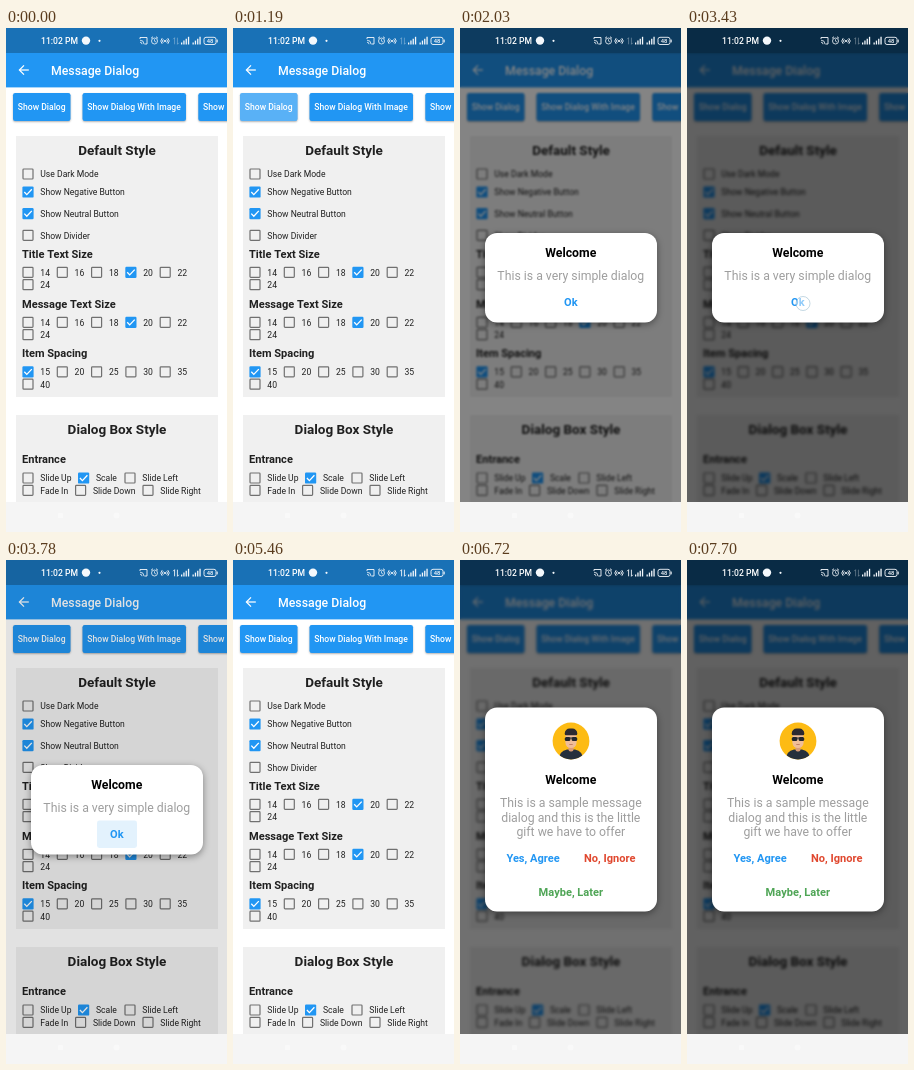
These frames come from a looping animation (221x504 px, 8 s). An HTML page with a canvas:

```html
<!DOCTYPE html>
<html lang="en">
<head>
<meta charset="utf-8">
<title>Message Dialog</title>
<style>
html, body { margin: 0; width: 100%; height: 100%; overflow: hidden; background: #fff; }
canvas { display: block; width: 221px; height: 504px; }
</style>
</head>
<body>
<canvas id="stage"></canvas>
<script>
const W = 221, H = 504, LOOP = 8000;
const BAR = 25, NAV = 474;
const BLUE = '#2196f3', INK = '#202020', CARD = '#f0f0f0';
const dpr = window.devicePixelRatio || 1;

function makeCanvas(el) {
  el.width = Math.round(W * dpr);
  el.height = Math.round(H * dpr);
  const c = el.getContext('2d');
  c.scale(dpr, dpr);
  return c;
}
const stage = makeCanvas(document.getElementById('stage'));
const pageCanvas = document.createElement('canvas');
const page = makeCanvas(pageCanvas);

const clamp = v => Math.max(0, Math.min(1, v));
const span = (t, a, b) => clamp((t - a) / (b - a));
const easeOut = p => 1 - (1 - p) ** 3;

// y is the middle of the capitals
function text(c, s, x, y, size, weight, color, align = 'left') {
  c.font = `${weight} ${size}px Roboto, sans-serif`;
  c.textAlign = align;
  c.fillStyle = color;
  c.fillText(s, x, y + size * 0.355);
}

function box(c, x, y, w, h, r, color) {
  c.fillStyle = color;
  c.beginPath();
  c.roundRect(x, y, w, h, r);
  c.fill();
}

function disc(c, x, y, r, color) {
  c.fillStyle = color;
  c.beginPath();
  c.arc(x, y, r, 0, Math.PI * 2);
  c.fill();
}

function line(c, pts, width, color) {
  c.strokeStyle = color;
  c.lineWidth = width;
  c.beginPath();
  pts.forEach(([x, y], i) => i ? c.lineTo(x, y) : c.moveTo(x, y));
  c.stroke();
}

function check(c, x, y, label, on) {
  if (on) {
    box(c, x - 5.6, y - 5.6, 11.2, 11.2, 1.2, BLUE);
    line(c, [[x - 3.7, y], [x - 1.2, y + 2.6], [x + 3.8, y - 2.7]], 1.3, '#fff');
  } else {
    c.strokeStyle = '#707070';
    c.lineWidth = 1.2;
    c.beginPath();
    c.roundRect(x - 5, y - 5, 10, 10, 0.8);
    c.stroke();
  }
  text(c, label, x + 12.3, y + 0.3, 8.6, 400, INK);
}

function sizes(c, title, y, values, picked) {
  text(c, title, 16, y, 11.05, 700, INK);
  values.forEach((v, i) =>
    check(c, 22 + (i % 5) * 34.3, y + 18.3 + (i > 4 ? 12.4 : 0), String(v), i === picked));
}

const buttons = [
  { x: 7, w: 57.5, label: 'Show Dialog' },
  { x: 76.5, w: 103.5, label: 'Show Dialog With Image' },
  { x: 192.3, w: 103.5, label: 'Show Dialog With Style' }
];

function drawButton(c, b) {
  c.save();
  c.shadowColor = 'rgba(0,0,0,.3)';
  c.shadowBlur = 2 * dpr;
  c.shadowOffsetY = dpr;
  box(c, b.x, 65, b.w, 28, 2.2, BLUE);
  c.restore();
  text(c, b.label, b.x + 4.8, 79.2, 8.6, 500, '#fff');
}

function ripple(c, b, x, age) {
  if (age < 0 || age > 480) return;
  c.save();
  c.beginPath();
  c.roundRect(b.x, 65, b.w, 28, 2.2);
  c.clip();
  c.globalAlpha = 0.25 * (1 - span(age, 250, 480));
  disc(c, x, 79, 6 + b.w * 0.6 * easeOut(span(age, 0, 280)), '#fff');
  c.restore();
}

function pointer(c, x, y, age, life) {
  if (age < 0 || age > life) return;
  disc(c, x, y, 7, 'rgba(255,255,255,.5)');
  c.strokeStyle = 'rgba(120,165,190,.55)';
  c.lineWidth = 0.8;
  c.stroke();
}

function drawPage(c, t) {
  c.fillStyle = '#fff';
  c.fillRect(0, 0, W, H);
  c.fillStyle = BLUE;
  c.fillRect(0, 0, W, 59.4);
  c.fillStyle = 'rgba(0,0,0,.25)';
  c.fillRect(0, 0, W, BAR);

  line(c, [[22.8, 42], [13.6, 42]], 1.25, '#fff');
  line(c, [[18, 37.4], [13.4, 42], [18, 46.6]], 1.25, '#fff');
  text(c, 'Message Dialog', 45, 42.3, 12.28, 500, '#fff');

  buttons.forEach(b => drawButton(c, b));
  ripple(c, buttons[0], 38, t - 1050);
  ripple(c, buttons[1], 130, t - 5880);

  box(c, 10, 108, 202, 261, 0, CARD);
  text(c, 'Default Style', 111, 122, 13.5, 700, INK, 'center');
  check(c, 22, 146, 'Use Dark Mode', false);
  check(c, 22, 164, 'Show Negative Button', true);
  check(c, 22, 185.6, 'Show Neutral Button', true);
  check(c, 22, 207.3, 'Show Divider', false);
  sizes(c, 'Title Text Size', 226, [14, 16, 18, 20, 22, 24], 3);
  sizes(c, 'Message Text Size', 276, [14, 16, 18, 20, 22, 24], 3);
  sizes(c, 'Item Spacing', 325.5, [15, 20, 25, 30, 35, 40], 0);

  box(c, 10, 387, 202, 100, 0, CARD);
  text(c, 'Dialog Box Style', 111, 401, 13.5, 700, INK, 'center');
  text(c, 'Entrance', 16, 431.3, 11.05, 700, INK);
  check(c, 22, 450, 'Slide Up', false);
  check(c, 77.6, 450, 'Scale', true);
  check(c, 124, 450, 'Slide Left', false);
  check(c, 22, 462.4, 'Fade In', false);
  check(c, 74.6, 462.4, 'Slide Down', false);
  check(c, 142, 462.4, 'Slide Right', false);
}

function drawStatus(c, t) {
  const ink = '#f4f8fc', faint = 'rgba(255,255,255,.35)';
  text(c, '11:02 PM', 35, 13, 8.6, 500, '#fff');
  disc(c, 80, 12.6, 4.2, ink);
  disc(c, 93.5, 12.8, 1.1, ink);

  // cast
  line(c, [[134, 11], [134, 9.5], [141, 9.5], [141, 16], [138.5, 16]], 0.9, ink);
  c.lineWidth = 0.8;
  [2, 4].forEach(r => {
    c.beginPath();
    c.arc(134, 16.2, r, -Math.PI / 2, 0);
    c.stroke();
  });
  // alarm
  c.beginPath();
  c.arc(148.5, 13, 3, 0, 7);
  c.stroke();
  line(c, [[148.5, 11.2], [148.5, 13.2], [150, 14]], 0.7, ink);
  line(c, [[145, 10.3], [147, 8.7]], 0.9, ink);
  line(c, [[150, 8.7], [152, 10.3]], 0.9, ink);
  // hotspot
  disc(c, 159, 13, 1.1, ink);
  c.strokeStyle = ink;
  [2.4, 4].forEach(r => [0, Math.PI].forEach(a => {
    c.beginPath();
    c.arc(159, 13, r, a - 0.8, a + 0.8);
    c.stroke();
  }));
  // data arrows
  const arrow = t > 3700 && t < 6800 ? ink : faint;
  line(c, [[168.6, 16.3], [168.6, 9.7], [167.2, 11.2]], 0.9, arrow);
  line(c, [[171.4, 9.7], [171.4, 16.3], [172.8, 14.8]], 0.9, arrow);
  // signal bars
  [175, 186.5].forEach(x => {
    for (let i = 0; i < 4; i++) {
      const h = 2 + i * 1.9;
      box(c, x + i * 2.3, 16.5 - h, 1.3, h, 0, ink);
    }
  });
  // battery
  c.strokeStyle = ink;
  c.lineWidth = 0.9;
  c.beginPath();
  c.roundRect(198, 9.3, 12, 7.2, 2);
  c.stroke();
  box(c, 210.6, 11.4, 1.1, 3, 0.4, ink);
  text(c, '48', 204, 13, 5.8, 500, ink, 'center');
}

function drawNav(c) {
  c.fillStyle = '#f5f5f5';
  c.fillRect(0, NAV, W, H - NAV);
  box(c, 52, 485, 5, 5, 0.5, '#f9f9f9');
  disc(c, 110.5, 487.5, 3, '#f9f9f9');
}

function avatar(c, x, y) {
  c.save();
  c.translate(x, y);
  disc(c, 0, 0, 18.4, '#fdbb14');
  c.clip();
  c.fillStyle = '#26303c';
  c.beginPath();
  c.moveTo(-12, 19);
  c.quadraticCurveTo(-12, 10, -4, 8.5);
  c.lineTo(4, 8.5);
  c.quadraticCurveTo(12, 10, 12, 19);
  c.fill();
  box(c, -2.5, 4, 5, 6.5, 2, '#d99b77');
  box(c, -5.6, -9, 11.2, 16, 5.4, '#f0bd98');
  box(c, -6.3, -12.5, 12.6, 6.8, [5, 5, 1.5, 1.5], '#2c2930');
  box(c, -6.2, -4, 5.6, 4, 1.5, '#22262c');
  box(c, 0.6, -4, 5.6, 4, 1.5, '#22262c');
  box(c, -2, -3.6, 4, 1, 0, '#22262c');
  box(c, -1.8, 3.2, 3.6, 0.9, 0.4, '#b86f58');
  c.restore();
}

function panel(c, y, h, scale, content) {
  if (scale <= 0) return;
  c.save();
  c.translate(111, y + h / 2);
  c.scale(scale, scale);
  c.translate(-111, -y - h / 2);
  c.save();
  c.shadowColor = 'rgba(0,0,0,.4)';
  c.shadowBlur = 7 * dpr;
  c.shadowOffsetY = 2 * dpr;
  box(c, 25, y, 172, h, 12, '#fff');
  c.restore();
  content();
  c.restore();
}

function simpleDialog(c, t, scale) {
  panel(c, 205, 89.5, scale, () => {
    const press = span(t, 3460, 3640);
    if (press > 0) {
      c.globalAlpha = press;
      box(c, 91, 260.5, 40, 27.5, 2.4, '#e3f2fd');
      c.globalAlpha = 1;
    }
    text(c, 'Welcome', 110.8, 224.4, 12.28, 700, '#000', 'center');
    text(c, 'This is a very simple dialog', 110.8, 248, 12.28, 400, '#9e9e9e', 'center');
    text(c, 'Ok', 110.8, 274.3, 11.05, 700, BLUE, 'center');
  });
}

function imageDialog(c, scale) {
  panel(c, 147.5, 204, scale, () => {
    avatar(c, 111, 181);
    text(c, 'Welcome', 110.8, 219.3, 12.28, 700, '#000', 'center');
    ['This is a sample message', 'dialog and this is the little', 'gift we have to offer']
      .forEach((s, i) => text(c, s, 110.8, 243 + i * 14.3, 12.28, 400, '#9e9e9e', 'center'));
    text(c, 'Yes, Agree', 73, 298, 11.05, 700, BLUE, 'center');
    text(c, 'No, Ignore', 149.7, 298, 11.05, 700, '#e0482f', 'center');
    text(c, 'Maybe, Later', 110.8, 332, 11.05, 700, '#4fa556', 'center');
  });
}

function draw(t) {
  const c = stage;
  const shade = t < 5000
    ? span(t, 1720, 2120) * (1 - span(t, 3480, 3850))
    : span(t, 6340, 6760);

  drawPage(page, t);
  c.drawImage(pageCanvas, 0, 0, W, H);
  const blur = 1.7 * shade ** 2;
  if (blur > 0.2) {
    c.save();
    c.beginPath();
    c.rect(0, BAR, W, NAV - BAR);
    c.clip();
    c.filter = `blur(${blur * dpr}px)`;
    c.drawImage(pageCanvas, 0, 0, W, H);
    c.restore();
  }
  c.fillStyle = `rgba(0,0,0,${0.62 * shade})`;
  c.fillRect(0, 0, W, NAV);
  drawStatus(c, t);
  drawNav(c);

  if (t < 5000) {
    simpleDialog(c, t, easeOut(span(t, 1360, 1680)) * (1 - span(t, 3820, 4060) ** 2));
  } else {
    imageDialog(c, easeOut(span(t, 6050, 6340)));
  }
  pointer(c, 38, 80, t - 1050, 140);
  pointer(c, 116, 275.5, t - 3430, 100);
  pointer(c, 130, 80, t - 5880, 130);
}

const start = performance.now();
function tick() {
  draw((performance.now() - start) % LOOP);
  requestAnimationFrame(tick);
}
tick();
</script>
</body>
</html>
```
